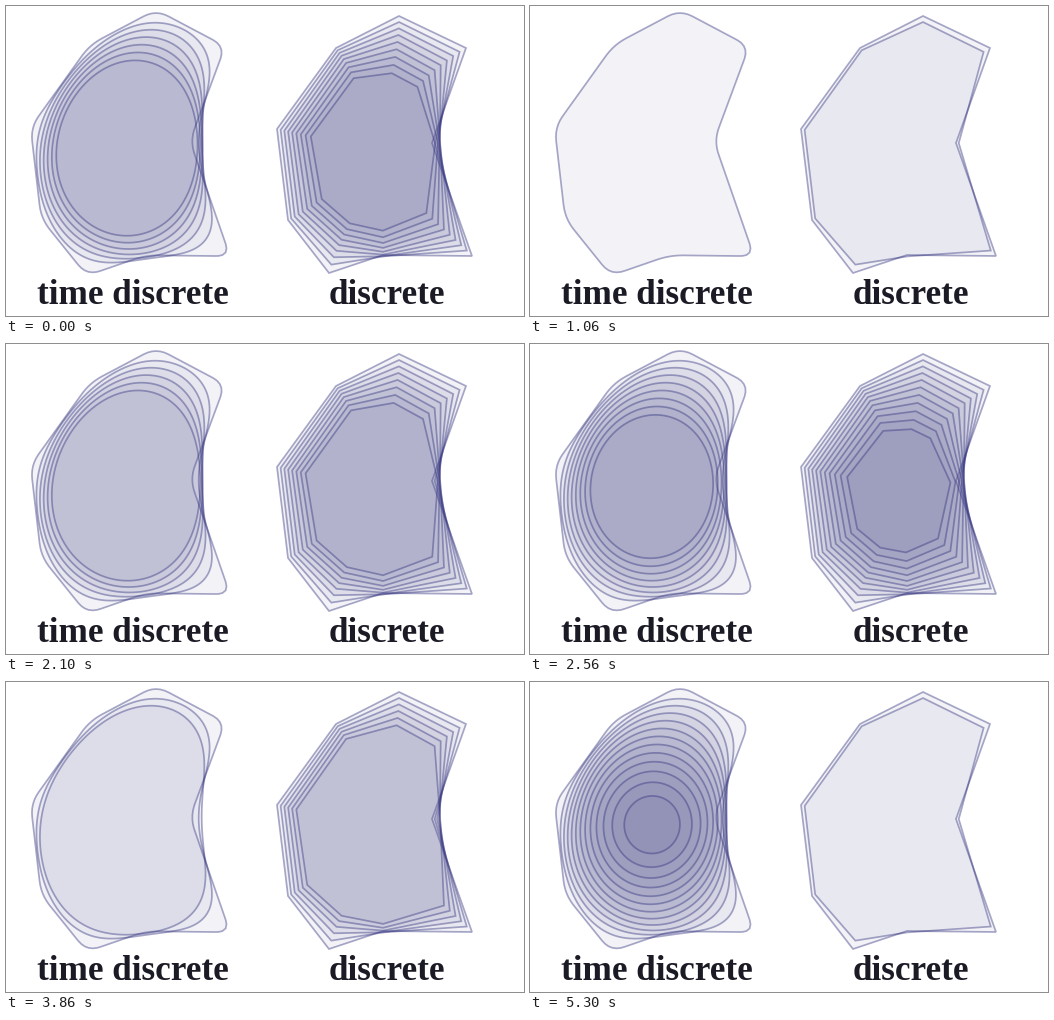
Recreate the animation shown at these times as a matplotlib script. Size 518 px wide and 310 px high, loop 5.34 s.

```python
import numpy as np
import matplotlib.pyplot as plt
from matplotlib.animation import FuncAnimation
from matplotlib.patches import Polygon

W, H, DPI = 518, 310, 100
STEP_MS, FRAMES = 20, 267
FILL = (80 / 255, 80 / 255, 142 / 255, 0.068)
EDGE = (48 / 255, 48 / 255, 125 / 255, 0.42)
INK = "#1b1b25"

SMOOTH = np.array([(150, 7), (85, 40), (27, 122), (37, 212), (82, 266),
                   (140, 250), (219.5, 247), (186, 135), (215, 42)], float)
CORNERS = np.array([(393, 10), (330, 42), (271, 123), (282, 214), (323, 267),
                    (377, 249), (466, 250), (426, 137), (460, 42)], float)


def neighbours(p):
    return np.roll(p, 1, 0), np.roll(p, -1, 0)


def unit(v):
    return v / np.linalg.norm(v, axis=1, keepdims=True)


def area(p):
    x, y = p.T
    return abs(np.sum(x * np.roll(y, -1) - y * np.roll(x, -1))) / 2


def rounded(hits, cut=14, count=180):
    """Closed curve with soft corners that passes through the given points."""
    prev, nxt = neighbours(hits)
    v = hits - cut / 4 * (unit(prev - hits) + unit(nxt - hits))
    prev, nxt = neighbours(v)
    a, b = v + cut * unit(prev - v), v + cut * unit(nxt - v)
    s = np.linspace(0, 1, 16)[:, None]
    path = np.vstack([(1 - s) ** 2 * p + 2 * s * (1 - s) * q + s ** 2 * r
                      for p, q, r in zip(a, v, b)])
    path = np.vstack([path, path[:1]])
    dist = np.r_[0, np.cumsum(np.hypot(*np.diff(path, axis=0).T))]
    at = np.linspace(0, dist[-1], count, endpoint=False)
    return np.column_stack([np.interp(at, dist, c) for c in path.T])


def shrink_curve(p, dt):
    """One implicit step of curve shortening flow."""
    n = len(p)
    ahead = np.linalg.norm(np.roll(p, -1, 0) - p, axis=1)
    back = np.roll(ahead, 1)
    k = 2 * dt / (ahead + back)
    i = np.arange(n)
    m = np.eye(n)
    m[i, i] += k / ahead + k / back
    m[i, (i + 1) % n] -= k / ahead
    m[i, (i - 1) % n] -= k / back
    return np.linalg.solve(m, p)


def shrink_polygon(p, dt):
    """Move each corner towards the centre of the circle through its neighbours."""
    prev, nxt = neighbours(p)
    a, b = prev - p, nxt - p
    aa, bb = np.sum(a * a, axis=1), np.sum(b * b, axis=1)
    cross = a[:, 0] * b[:, 1] - a[:, 1] * b[:, 0]
    side = aa[:, None] * b - bb[:, None] * a
    chord = np.sum((b - a) ** 2, axis=1)
    # curvature vector, c / |c|^2 for circumcentre c
    pull = 2 * cross[:, None] * np.column_stack([-side[:, 1], side[:, 0]])
    return p - dt * pull / (aa * bb * chord)[:, None]


def flow(p, shrink, dt, steps, sub):
    shots = [p]
    for _ in range(steps):
        for _ in range(sub):
            p = shrink(p, dt / sub)
        shots.append(p)
    return shots


fig = plt.figure(figsize=(W / DPI, H / DPI), dpi=DPI, facecolor="white")
ax = fig.add_axes([0, 0, 1, 1])
ax.set(xlim=(0, W), ylim=(H, 0))
ax.axis("off")


def stack(shots):
    return [ax.add_patch(Polygon(s, closed=True, fc=FILL, ec=EDGE, lw=1.25,
                                 joinstyle="miter")) for s in shots]


def label(x, text):
    ax.text(x, 297.5, text, family="Liberation Serif", weight="bold",
            size=35.1 * 72 / DPI, color=INK, ha="center", va="baseline")


curve = rounded(SMOOTH)
curve_dt = (area(curve) - 2100) / (24 * np.pi)
left = stack(flow(curve, shrink_curve, curve_dt, 12, 20))
right = stack(flow(CORNERS, shrink_polygon, 485, 12, 200))
label(126.5, "time discrete")
label(381, "discrete")


def steps_done(ms):
    """Steps come slightly faster as the shape shrinks."""
    return int(25 * (np.exp(0.2 * ms / 1000) - 1))


def draw(i):
    t = i * STEP_MS
    for layers, shift, period in ((left, 1230, 2270), (right, 1390, 2140)):
        done = steps_done((t + shift) % period)
        for k, layer in enumerate(layers):
            layer.set_visible(k <= done)
    return left + right


anim = FuncAnimation(fig, draw, frames=FRAMES, interval=STEP_MS,
                     repeat=True, repeat_delay=0, blit=False)
plt.show()
```
